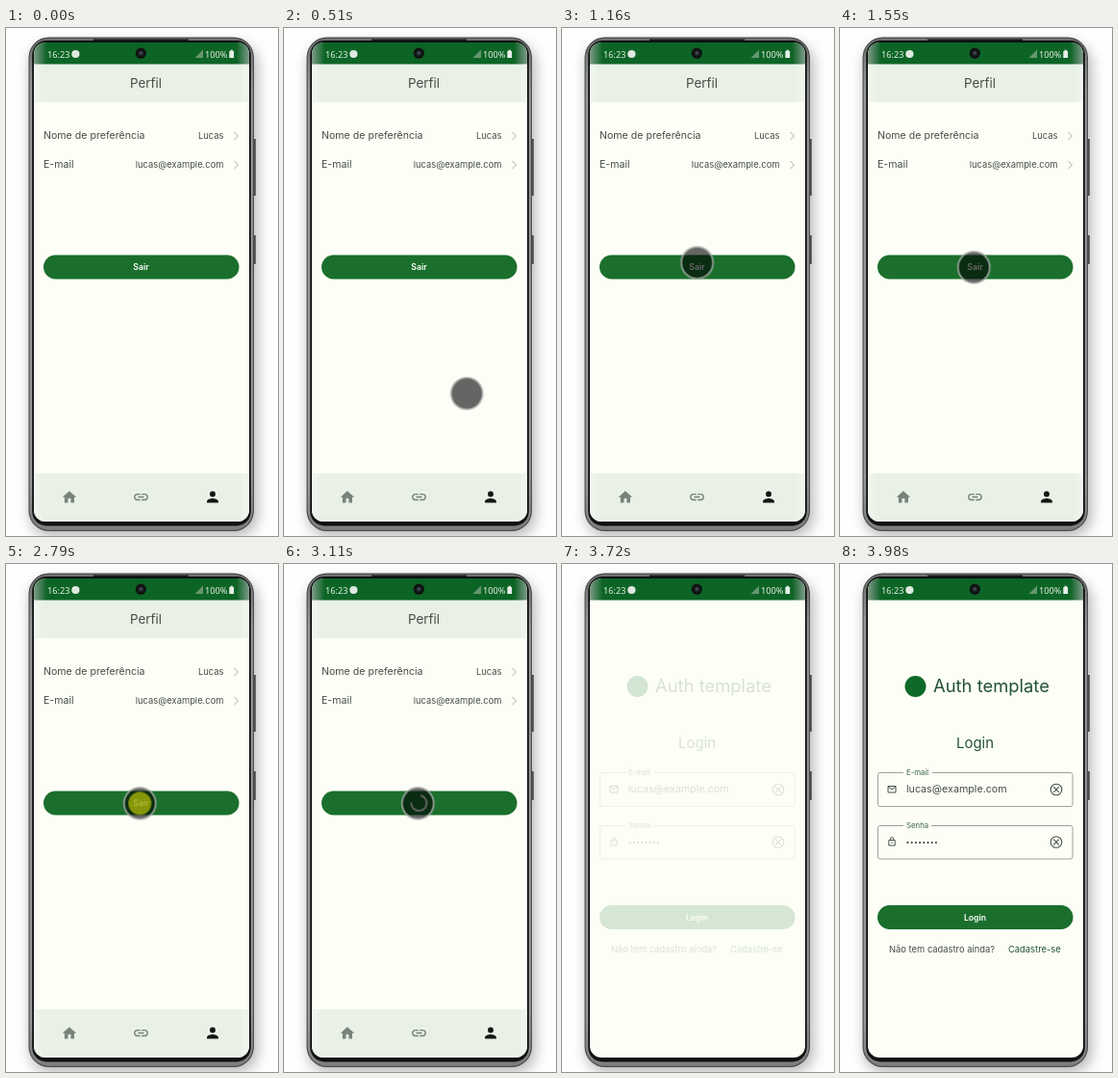
Write an HTML page that moves like this. It is 283x527 px and loops after 6960 ms.

```html
<!DOCTYPE html>
<html lang="pt-BR">
<head>
<meta charset="utf-8">
<title>Perfil e login</title>
<style>
html, body { margin: 0; width: 100%; height: 100%; overflow: hidden; background: #fefefe; }
svg { display: block; width: 100vw; height: 100vh; }
text { font-family: Inter, "Open Sans", sans-serif; fill: #454d46; }
.status text { font: 9.2px "Noto Sans", sans-serif; fill: #e6efe7; }
.btn { fill: #1b6f2c; }
.btn + text, .label { font-size: 8.7px; font-weight: 600; fill: #fff; text-anchor: middle; }
.value { font-size: 9.4px; text-anchor: end; }
.row { font-size: 10.6px; }
.small { font-size: 9.4px; }
.cap { font-size: 7.8px; fill: #3a6349; }
.brand { fill: #235237; }
.line { fill: none; stroke: #98a497; }
.ink { fill: none; stroke: #465048; }

.profile, .login, .nav, .label, .spinner, .cursor, .show, .tap {
  animation: 6960ms linear infinite;
}
.profile { animation-name: leave; }
.login { animation-name: enter; }
.cursor { animation-name: move; }
.nav, .label, .spinner, .show, .tap { animation-timing-function: step-end; }
.nav { animation-name: nav; }
.label { animation-name: label; }
.spinner { animation-name: load; }
.show { animation-name: show; }
.tap { animation-name: tap; }
.arc { animation: spin 870ms linear infinite; }

@keyframes leave { 0%, 48.85% { opacity: 1 } 52.67%, 100% { opacity: 0 } }
@keyframes enter { 0%, 52.73% { opacity: 0 } 57.04%, 100% { opacity: 1 } }
@keyframes nav { 0% { opacity: 1 } 48.56%, 100% { opacity: 0 } }
@keyframes label { 0% { opacity: 1 } 42.1%, 100% { opacity: 0 } }
@keyframes load { 0% { opacity: 0 } 42.1%, 100% { opacity: 1 } }
@keyframes show { 0% { opacity: 0 } 2.58% { opacity: 1 } 51.44%, 100% { opacity: 0 } }
@keyframes tap { 0% { opacity: 0 } 40.08% { opacity: 1 } 42.1%, 100% { opacity: 0 } }
@keyframes spin { from { transform: rotate(76deg) } to { transform: rotate(436deg) } }
@keyframes move {
  0%, 2.58% { transform: translate(256px, 480px) }
  7.2% { transform: translate(192px, 382px) }
  12.07% { transform: translate(131px, 285px) }
  12.93% { transform: translate(128.5px, 260px) }
  13.79% { transform: translate(126px, 251px) }
  14.94% { transform: translate(130px, 245px) }
  17.24% { transform: translate(144px, 243px) }
  19.11% { transform: translate(148px, 244px) }
  22.27%, 100% { transform: translate(139.3px, 248.3px) }
}
</style>
</head>
<body>
<svg viewBox="0 0 283 527" preserveAspectRatio="none">
  <defs>
    <clipPath id="screen"><rect x="29" y="15" width="224" height="497" rx="12"/></clipPath>
    <linearGradient id="bar">
      <stop offset="0" stop-color="#7d9d86"/><stop offset=".025" stop-color="#4f8260"/>
      <stop offset=".06" stop-color="#0c6425"/><stop offset=".94" stop-color="#0c6425"/>
      <stop offset=".975" stop-color="#4f8260"/><stop offset="1" stop-color="#7d9d86"/>
    </linearGradient>
    <linearGradient id="panel">
      <stop offset="0" stop-color="#f2f6ef"/><stop offset=".04" stop-color="#e9f1e7"/>
      <stop offset=".96" stop-color="#e9f1e7"/><stop offset="1" stop-color="#f2f6ef"/>
    </linearGradient>
    <linearGradient id="metal" x2="0" y2="1">
      <stop offset="0" stop-color="#6f7171"/><stop offset=".1" stop-color="#979999"/>
      <stop offset=".9" stop-color="#979999"/><stop offset="1" stop-color="#7c7e7e"/>
    </linearGradient>
    <filter id="soft" x="-20%" y="-10%" width="140%" height="120%"><feGaussianBlur stdDeviation="7"/></filter>
    <path id="chevron" d="M237.5 108l4 4-4 4" fill="none" stroke="#a5aaa5"/>
    <g id="clear" class="ink">
      <circle r="5.8" stroke-width="1.1"/>
      <path d="M-2.8-2.8l5.6 5.6M2.8-2.8l-5.6 5.6" stroke-width="1.1"/>
    </g>
  </defs>

  <rect width="283" height="527" fill="#fefefe"/>
  <rect x="25" y="16" width="237" height="512" rx="22" opacity=".27" filter="url(#soft)"/>

  <g class="phone">
    <path d="M258.5 115v59M258.5 215v30" stroke="#4b4b4b" stroke-width="2.6"/>
    <rect x="23.5" y="9.5" width="234.5" height="512.5" rx="21" fill="#4d4f4f"/>
    <rect x="24.7" y="10.7" width="232.1" height="510.1" rx="20" fill="url(#metal)"/>
    <rect x="27.2" y="13" width="227.6" height="503.5" rx="15" fill="#101111"/>
    <path d="M91 12.3h99" stroke="#1a1a1a" stroke-width="1.6"/>
  </g>

  <g clip-path="url(#screen)">
    <rect x="29" y="15" width="224" height="497" fill="#fdfff7"/>

    <g class="profile">
      <rect x="29" y="37" width="224" height="40" fill="url(#panel)"/>
      <text x="145.5" y="62" font-size="13.4" text-anchor="middle">Perfil</text>
      <text class="row" x="39" y="115.3">Nome de preferência</text>
      <text class="value" x="226.5" y="115.3">Lucas</text>
      <use href="#chevron"/>
      <text class="row" x="39" y="145">E-mail</text>
      <text class="value" x="226.5" y="145">lucas@example.com</text>
      <use href="#chevron" y="30"/>
      <rect class="btn" x="39" y="235.5" width="203.5" height="25" rx="12.5"/>
      <text class="label" x="140.5" y="251">Sair</text>
      <g class="spinner">
        <g transform="translate(140.5 248)">
          <circle class="arc" r="8" fill="none" stroke="#fff" stroke-width="2" pathLength="100" stroke-dasharray="72 28"/>
        </g>
      </g>
      <g class="nav">
        <rect x="29" y="462" width="224" height="50" fill="url(#panel)"/>
        <path transform="translate(57.3 478) scale(.72)" fill="#77827a" d="M10 20v-6h4v6h5v-8h3L12 3 2 12h3v8z"/>
        <path transform="translate(131.6 477.7) scale(.74)" fill="#77827a" d="M3.9 12c0-1.7 1.4-3.1 3.1-3.1h4V7H7a5 5 0 000 10h4v-1.9H7c-1.7 0-3.1-1.4-3.1-3.1zM8 13h8v-2H8zm9-6h-4v1.9h4a3.1 3.1 0 010 6.2h-4V17h4a5 5 0 000-10z"/>
        <path transform="translate(206.1 477.6) scale(.74)" fill="#111813" d="M12 12a4 4 0 100-8 4 4 0 000 8zm0 2c-2.7 0-8 1.3-8 4v2h16v-2c0-2.7-5.3-4-8-4z"/>
      </g>
    </g>

    <g class="login">
      <circle cx="78.5" cy="127" r="11" fill="#0e6a28"/>
      <text class="brand" x="97" y="133" font-size="18.4">Auth template</text>
      <text class="brand" x="140.5" y="191" font-size="14.9" text-anchor="middle">Login</text>

      <rect class="line" x="39.5" y="216.5" width="202.5" height="35" rx="2"/>
      <rect x="66" y="215" width="30" height="4" fill="#fdfff7"/>
      <text class="cap" x="69" y="219.3">E-mail</text>
      <path class="ink" d="M50 230.5h8v6.5h-8zM50 231l4 3 4-3"/>
      <text x="69" y="237.3" font-size="10.7">lucas@example.com</text>
      <use href="#clear" x="225" y="234"/>

      <rect class="line" x="39.5" y="271.5" width="202.5" height="34.5" rx="2"/>
      <rect x="66" y="269.5" width="29" height="4" fill="#fdfff7"/>
      <text class="cap" x="69" y="273.8">Senha</text>
      <path class="ink" d="M50.8 286.5h6.4v5.5h-6.4zM52.3 286.5v-1.2a1.7 1.7 0 013.4 0v1.2M54 288.5v1.5"/>
      <path d="M70.5 289h30.5" fill="none" stroke="#39403a" stroke-width="2.2" stroke-linecap="round" stroke-dasharray="0 4.2"/>
      <use href="#clear" x="225" y="288.5"/>

      <rect class="btn" x="39" y="354" width="203.5" height="25" rx="12.5"/>
      <text x="140.5" y="369.5">Login</text>
      <text class="small" x="51" y="403.2">Não tem cadastro ainda?</text>
      <text class="small brand" x="175" y="403.2">Cadastre-se</text>
    </g>

    <g class="status">
      <rect x="29" y="15" width="224" height="22.5" fill="url(#bar)"/>
      <text x="43" y="30.6">16:23</text>
      <circle cx="72.4" cy="27" r="4.1" fill="#dfe9e0"/>
      <path d="M205 22.5v8.5h-8.5z" fill="#64976f"/>
      <text x="207" y="30.6">100%</text>
      <path d="M232.3 24h1.2v-1.2h2.4V24h1.2v7h-4.8z" fill="#e6efe7"/>
    </g>
    <circle cx="140.3" cy="26.2" r="5.6" fill="#101312"/>
    <circle cx="140.3" cy="26.2" r="2.6" fill="#262b2d"/>
    <circle cx="140.3" cy="25.8" r="1" fill="#59656b"/>
  </g>

  <g class="show">
    <g class="cursor">
      <circle r="16.5" fill="#000" fill-opacity=".6"/>
      <circle class="tap" r="12" fill="#ff0" fill-opacity=".5"/>
      <circle r="16.5" fill="none" stroke="#b4b4b4" stroke-opacity=".85" stroke-width="1.7"/>
    </g>
  </g>
</svg>
</body>
</html>
```
